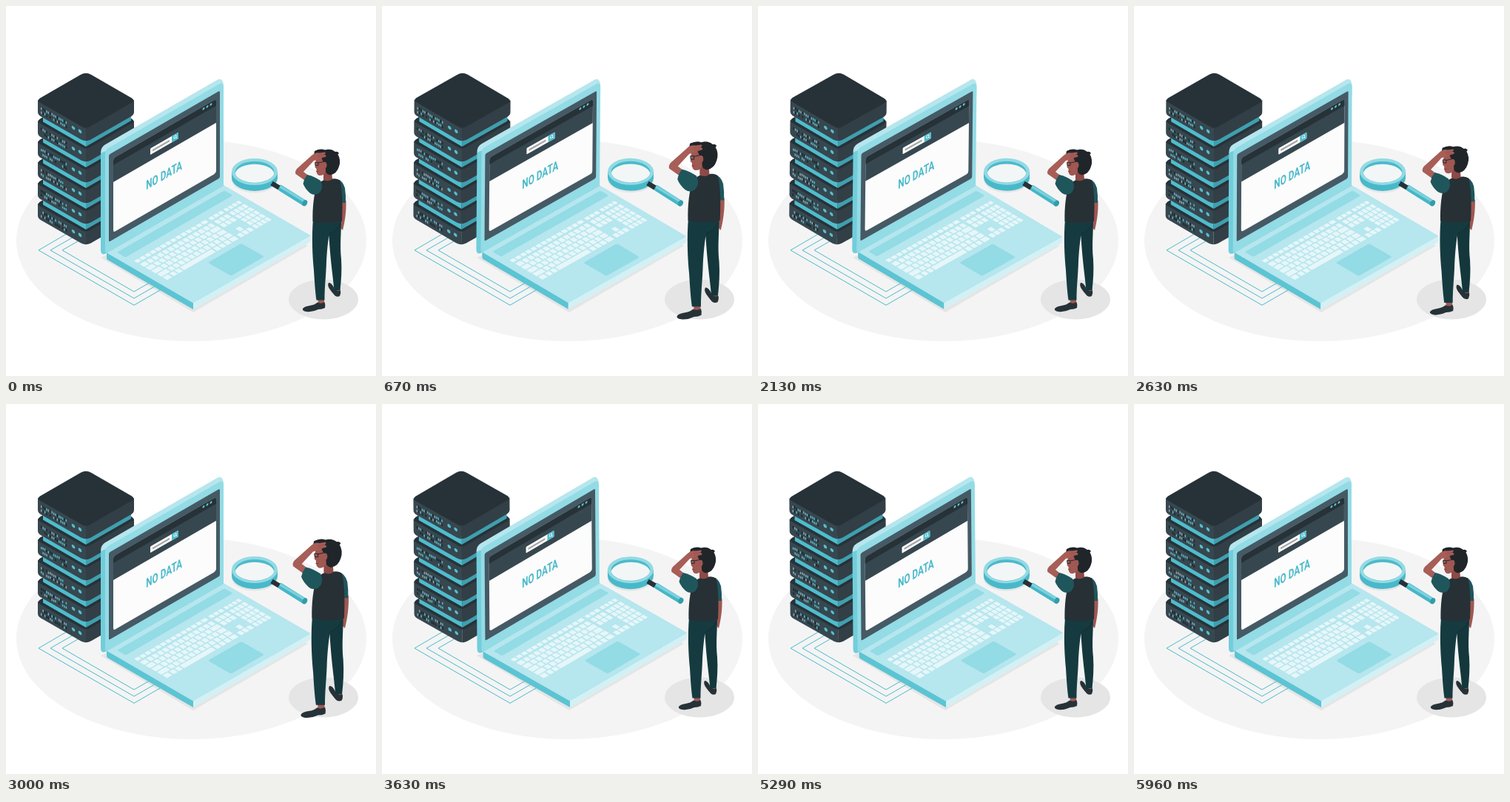
Recreate the animation shown at these times as an HTML page. Size 500 by 500 pixels, loop 6000 ms.

```html
<!DOCTYPE html>
<html lang="en">
<head>
<meta charset="utf-8">
<title>No data</title>
<style>
html, body { margin: 0; width: 100%; height: 100%; overflow: hidden; background: #fff; }
svg { display: block; width: 100%; height: 100%; }
</style>
</head>
<body>
<svg viewBox="0 0 500 500">
  <!-- floor -->
  <ellipse cx="250.5" cy="317" rx="236.5" ry="136" fill="#f4f4f4"/>
  <ellipse cx="429" cy="396.5" rx="47" ry="27" fill="#e5e5e5"/>
  <path d="M128 340L253 414L408 324L300 262Z" fill="#e5e5e5"/>
  <path d="M86 305.500L44 330L173 404.300L215 380M100 307L60 330L173 395L200 379.500M116 307L76 330L173 386L200 370.500"
        fill="none" stroke="#4bbacb" stroke-linejoin="round"/>

  <g id="server"></g>

  <g id="laptop">
    <!-- base -->
    <path d="M136 333V341Q136 342.500 138 343.500L253 410V400Z" fill="#5cc4d3"/>
    <path d="M253 400V410L410 319.500Q411.500 318.500 411.500 317V309Z" fill="#d3f1f5"/>
    <path d="M136 333.500L294 242L409 308.500Q412.500 310 409 312L253 401.500Z" fill="#b6e6ee"/>
    <g transform="matrix(1 .577 1 -.577 136 333.500)">
      <rect x="6.500" y="7.500" width="11.500" height="145" rx="2" fill="#93dbe5"/>
      <rect x="80" y="57" width="31" height="45" rx="2" fill="#93dbe5"/>
      <g id="keys" fill="#e6f6f9"></g>
    </g>
    <!-- lid, drawn on the plane of the screen -->
    <g transform="matrix(1 -.577 0 1 145 206)">
      <path d="M-17 -17Q-17 -25 -11 -25H138Q147 -27 149 -14V0H-11Z" fill="#b6e6ee"/>
      <path d="M-17 -17L-8 -15V123Q-17 123 -17 114Z" fill="#72cddb"/>
      <path d="M-11 -12Q-11 -18 -6 -18H143Q149 -18 149 -10V123H-7Q-11 123 -11 118Z" fill="#93dbe5"/>
      <rect x="-6" y="-8.500" width="150" height="118" rx="2" fill="#455a64"/>
      <rect width="139" height="100" rx="3" fill="#fcfcfc"/>
      <path d="M0 32V3Q0 0 3 0H136Q139 0 139 3V32Z" fill="#37474f"/>
      <path d="M0 9V3Q0 0 3 0H136Q139 0 139 3V9Z" fill="#263238"/>
      <g fill="#5fc6d5">
        <circle cx="122" cy="3.200" r="1.500"/><circle cx="127" cy="3.200" r="1.500"/><circle cx="132" cy="3.200" r="1.500"/>
      </g>
      <g transform="translate(0 1)">
        <rect x="50" y="14.500" width="38" height="8.500" rx="1" fill="#fff"/>
        <path d="M79 14.500H87Q88 14.500 88 15.500V22Q88 23 87 23H79Z" fill="#4fbdcd"/>
        <path d="M53 18.800H76" stroke="#a6a6a6" stroke-width="2.600"/>
        <circle cx="83.500" cy="18" r="1.700" fill="none" stroke="#fff" stroke-width=".8"/>
        <path d="M84.600 19.300L86 21" stroke="#fff" stroke-width=".9"/>
      </g>
      <text transform="translate(44.300 68) scale(.68 1)" font-family="Roboto, sans-serif" font-weight="700"
            font-size="17.300" fill="#4bbacb">NO DATA</text>
    </g>
  </g>

  <g id="lens">
    <ellipse cx="336" cy="235" rx="31" ry="17.500" fill="#e6e6e6"/>
    <path d="M305 224V232A31 18 0 0 0 367 232V224Z" fill="#48b9ca"/>
    <ellipse cx="336" cy="224" rx="31" ry="18" fill="#93dae4"/>
    <ellipse cx="336" cy="224.500" rx="26.500" ry="14.500" fill="#4bbacb"/>
    <path d="M309.700 226A26.500 14.500 0 0 0 362.300 226A26.500 14 0 0 0 309.700 226Z" fill="#f3f6f6"/>
    <path d="M371 246L403 266" stroke="#46b6c7" stroke-width="8" stroke-linecap="round"/>
    <path d="M371 244.300L403 263.500" stroke="#7bd1dd" stroke-width="3.600" stroke-linecap="round"/>
    <path d="M359 239.500L369 245.500" stroke="#263238" stroke-width="6.500"/>
    <ellipse cx="403.800" cy="266.300" rx="3.200" ry="4.300" transform="rotate(28 404 266)" fill="#359baa"/>
  </g>

  <g id="man">
    <!-- far arm, ankles and shoes -->
    <path d="M452 262L459.500 263C460 278 458 291 455 303L450 298Z" fill="#9f5852"/>
    <path d="M444 381H451.500L451 389H445ZM421.500 395H430V405H422Z" fill="#9f5852"/>
    <path d="M436 374C439 373.500 442 377.500 444 382.500Q448 386.500 452 384Q453 388.500 451 392Q446 394.500 442 388.500C439 384.500 433 378.500 436 374Z" fill="#263238"/>
    <path d="M421 400.500Q426 403 430.500 400Q432 404 431 408Q427 410 422 410Q414 414 406 413Q400 412 401 409Q403 406 410 405Q417 404 421 400.500Z" fill="#263238"/>
    <!-- trousers -->
    <path d="M431 290H453C453 307 451 323 453 342C454 357 453 371 451.500 384H443.500C442 366 438.500 345 436.500 312Z" fill="#14373c"/>
    <path d="M415 288C413 312 414 336 416 357C417 374 418 387 419.500 397.500H430.500C430.500 379 432.500 365 433 345C434 328 435 318 437 307Q448 304 453 290Z" fill="#153b40"/>
    <path d="M437 307Q447 304 451 294" fill="none" stroke="#102f33" stroke-width=".8"/>
    <!-- torso -->
    <path d="M447 234Q455 235.500 458 246Q459.500 256 459 266L452 266Z" fill="#1f565c"/>
    <path d="M426 237Q432 233 439 234Q447 232 451.500 236C455 250 455 274 454 291Q435 296 414.500 291C414 273 416 253 421 241Z" fill="#263035"/>
    <path d="M429 222L440 221L441 234Q436 238 429 235Z" fill="#8d4a46"/>
    <!-- head -->
    <path d="M419 207C418 211 418 214 417.500 218L419.500 220Q419 228 423 229Q429 230 433 223L437 207L428 200Z" fill="#9f5852"/>
    <path d="M417 196Q425 192 431 194.500Q439 192 445 197Q448 196 450 199L448.500 200.500Q453 208 450 217Q447 227 438 228.500Q431 227 432 221L431 213Q427 209 426 204Q420 206 416 201Z" fill="#20252a"/>
    <ellipse cx="430.500" cy="215" rx="3" ry="4.300" fill="#9f5852"/>
    <path d="M417.500 211.500H422V215.500H418ZM422 212L429 210.500" fill="none" stroke="#20252a" stroke-width=".9"/>
    <path d="M419 223.500H422.500" stroke="#743a38" stroke-width=".7"/>
    <!-- raised arm -->
    <path d="M407 238L391.500 227Q390 224 393 220L413 202Q418 197 424 198.500L431 197.500Q433 199 430 200.500L432.500 202Q433 204 429 204.500L424 206.500Q420 208 416 209L402 224L415 234Z" fill="#a75e57"/>
    <path d="M421 202L430 200.500M422 204.500L429 203.500" stroke="#8d4a46" stroke-width=".6"/>
    <path d="M407 228Q416 230 425 236Q430 246 423 253Q417 257 411 253Q404 247 401.500 240Q403 233 407 228Z" fill="#1f565c"/>
  </g>
</svg>
<script>
const LOOP = 6000;
const byId = id => document.getElementById(id);
let seed = 7;
const random = () => (seed = seed * 16807 % 2147483647) / 2147483647;
const rect = (x, y, w, h, extra = '') =>
  `<rect x="${x}" y="${y}" width="${w}" height="${h}" ${extra}/>`;

function lights() {
  let out = '';
  for (let row = 0; row < 2; row++)
    for (let i = 0; i < 15; i++) {
      const pick = random();
      if (pick < .12) continue;
      const color = pick < .55 ? '#1d272c' : pick < .88 ? '#5bb9c8' : '#8fa8b0';
      out += rect(4 + i * 2.4, 6.5 + row * 5.5 + random(), 1.5, 3.2, `fill="${color}"`);
    }
  return out + '<g fill="#55bfce"><circle cx="48" cy="10" r="2.300"/><circle cx="57" cy="9.500" r="2.300"/></g>';
}

function unit(i) {
  const side = 'M-65 0V16Q-65 20 -61 22.300L-7 53.300Q-3 55.300 0 55.300V37Z';
  const spacer = i ? `
    <path d="M-58 -9V1.500L0 35V24Z" fill="#4fbccc"/>
    <path d="M61 -9V0L0 35V24Z" fill="#3f9fae"/>` : '';
  return `<g transform="translate(108 ${127 + 28 * i})">
    <path d="${side}" fill="#37474f"/>
    <path d="${side}" fill="#323f46" transform="scale(-1 1)"/>
    <path d="M-62 -2.600L-7 -34.300Q0 -38.300 7 -34.300L62 -2.600Q67 1 62 3.500L5 36.300Q0 39 -5 36.300L-62 3.500Q-67 1 -62 -2.600Z" fill="#263238"/>
    <g transform="matrix(1 .577 0 1 -65 0)">${lights()}</g>${spacer}</g>`;
}

function keys() {
  let out = '';
  const key = (row, v, length) => out += rect(28 + row * 7.7, v, row ? 6.3 : 4.8, length, 'rx=".6"');
  for (let row = 0; row < 5; row++) {
    const shift = row * 1.7;
    const wide = row > 1;
    key(row, 9, 5.3 + shift);
    for (let i = 1; i < (wide ? 12 : 13); i++) key(row, 9 + shift + i * 6.9, 5.4);
    if (wide) key(row, 9 + shift + 82.8, 14 - shift);
    else key(row, 9 + shift + 89.7, 6.5 - shift);
  }
  for (const [v, length] of [[9, 7], [18, 5.4], [25, 5.4], [32, 43], [77, 5.4], [84, 5.4], [91, 5.4], [98, 7.7]])
    key(5, v, length);
  for (let i = 0; i < 3; i++) {
    for (const row of [0, 1, 2, 5]) key(row, 109 + i * 6.3, 5);
    if (i == 1) key(4, 115.3, 5);
  }
  for (let row = 0; row < 6; row++)
    for (let i = 0; i < 4; i++) key(row, 129.5 + i * 5.5, 4.3);
  return out;
}

byId('server').innerHTML = [5, 4, 3, 2, 1, 0].map(unit).join('');
byId('keys').innerHTML = keys();

// Linear interpolation through [position, value] stops
function track(p, stops) {
  const i = stops.findIndex(s => s[0] > p);
  const [a, from] = stops[i - 1], [b, to] = stops[i];
  return from + (to - from) * (p - a) / (b - a);
}
const sway = [[0, 0], [.25, 1], [.75, -1], [1, 0]];
const pulse = [[0, 1], [.1, 1.1], [.3, 1], [.4, 1], [.5, 1.1], [.6, 1], [1, 1]];
const pivots = { server: '108 207', laptop: '270 255', lens: '356 239' };

function draw() {
  const p = performance.now() % LOOP / LOOP;
  const angle = track(p, sway);
  for (const id in pivots)
    byId(id).setAttribute('transform', `rotate(${angle} ${pivots[id]})`);
  byId('man').setAttribute('transform',
    `translate(425.5 304) scale(${track(p, pulse)}) translate(-425.5 -304)`);
  requestAnimationFrame(draw);
}
draw();
</script>
</body>
</html>
```
